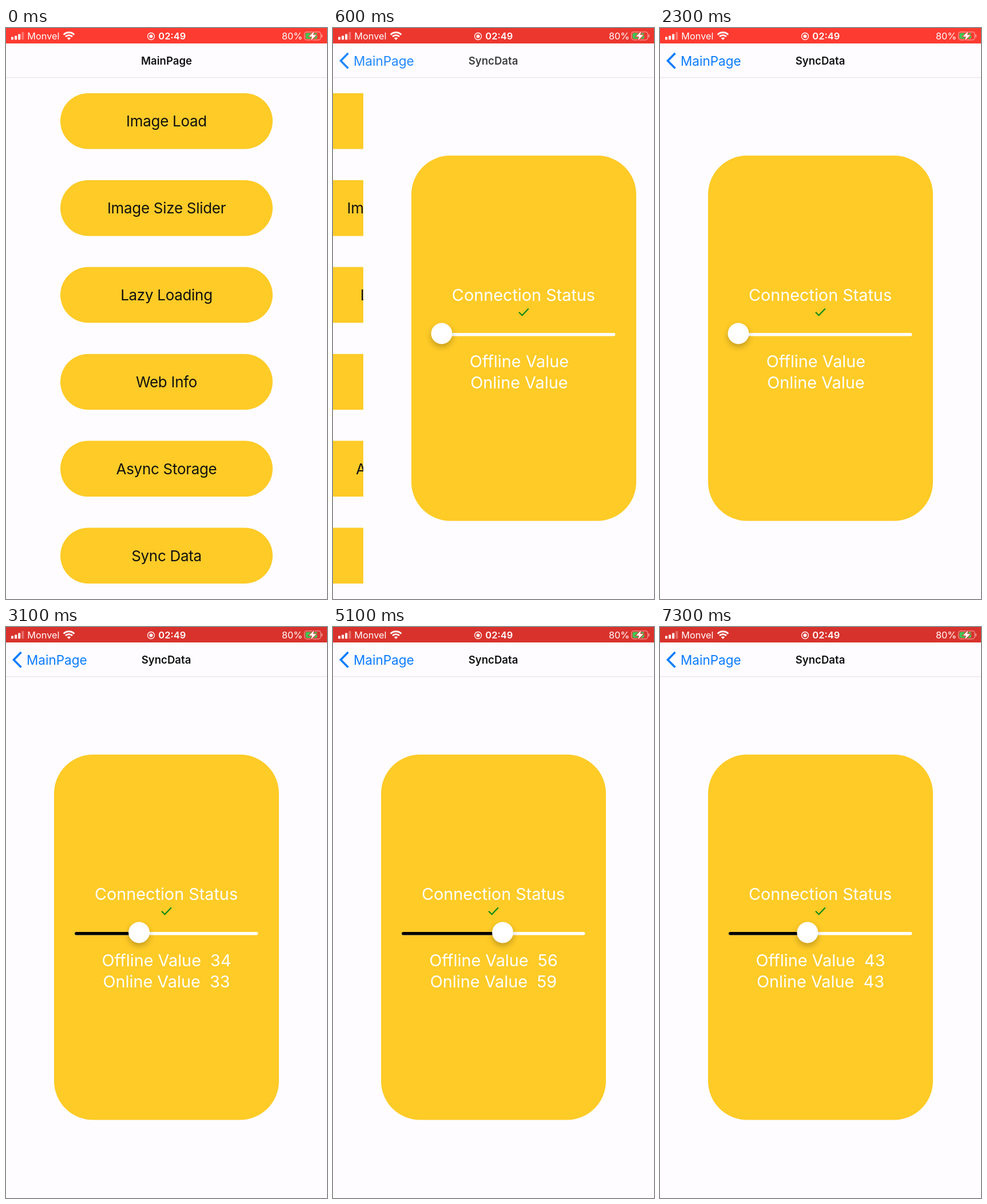
An HTML page with a canvas for the animation above (7.4 s loop, 561 by 998 pixels).

```html
<!DOCTYPE html>
<html lang="en">
<head>
<meta charset="utf-8">
<title>Sync demo</title>
<style>
html, body { margin: 0; width: 100%; height: 100%; overflow: hidden; background: #fefcff; }
canvas { display: block; width: 561px; height: 998px; }
</style>
</head>
<body>
<canvas id="stage" width="561" height="998"></canvas>
<script>
const ctx = document.getElementById('stage').getContext('2d');
const W = 561, H = 998, LOOP = 7400, STEP = 100;
const YELLOW = '#fecb27', PAGE = '#fefcff', INK = '#111', BLUE = '#0a7cff';
const MENU = ['Image Load', 'Image Size Slider', 'Lazy Loading', 'Web Info', 'Async Storage', 'Sync Data'];

// Slider drag: [time in ms, value]
const DRAG = [[2400, 0], [2800, 27], [3100, 33.3], [4000, 100], [4300, 100], [5100, 55.6],
  [5900, 10], [6100, 10], [6900, 47], [7300, 42.1]];
const ONLINE_DELAY = 50;

const clamp = (v, lo = 0, hi = 1) => Math.min(hi, Math.max(lo, v));

function sliderValue(t) {
  const next = DRAG.findIndex(([time]) => time > t);
  if (next === 0) return 0;
  if (next < 0) return DRAG[DRAG.length - 1][1];
  const [t0, v0] = DRAG[next - 1], [t1, v1] = DRAG[next];
  return v0 + (v1 - v0) * (t - t0) / (t1 - t0);
}

// Critically damped spring, 0 to 1
function pushProgress(t) {
  const x = Math.max(0, t - 383) * 0.01826;
  return 1 - (1 + x) * Math.exp(-x);
}

function text(str, x, y, size, color, { align = 'center', weight = 400, spacing = 0 } = {}) {
  ctx.font = `${weight} ${size}px Inter, sans-serif`;
  ctx.letterSpacing = spacing + 'px';
  ctx.textAlign = align;
  ctx.fillStyle = color;
  ctx.fillText(str, x, y);
}

function box(x, y, w, h, r, color) {
  ctx.fillStyle = color;
  ctx.beginPath();
  ctx.roundRect(x, y, w, h, r);
  ctx.fill();
}

function disc(x, y, r, color) {
  ctx.fillStyle = color;
  ctx.beginPath();
  ctx.arc(x, y, r, 0, 2 * Math.PI);
  ctx.fill();
}

function line(points, width, color) {
  ctx.strokeStyle = color;
  ctx.lineWidth = width;
  ctx.beginPath();
  points.forEach(([x, y]) => ctx.lineTo(x, y));
  ctx.stroke();
}

function layer(dx, draw) {
  ctx.save();
  ctx.translate(dx, 0);
  draw();
  ctx.restore();
}

function faded(alpha, draw) {
  ctx.save();
  ctx.globalAlpha = alpha;
  draw();
  ctx.restore();
}

function menuPage() {
  MENU.forEach((label, i) => {
    const y = 114 + i * 151.9;
    box(95, y, 371, 97.5, 48.7, YELLOW);
    text(label, 280.5, y + 58, 26, INK, { spacing: -0.3 });
  });
}

function slider(value) {
  const x = 137 + value * 2.87;
  box(120, 533, 320.5, 5.4, 2.7, '#fff');
  if (value > 0) box(120, 533, x - 120, 5.4, 2.7, '#000');
  ctx.save();
  ctx.shadowColor = 'rgba(0,0,0,.24)';
  ctx.shadowBlur = 11;
  ctx.shadowOffsetY = 5;
  disc(x, 534, 18.5, '#fff');
  ctx.restore();
}

function syncPage(t) {
  const value = sliderValue(t);
  const shown = v => t > DRAG[0][0] ? Math.ceil(v) : '';
  ctx.fillStyle = PAGE;
  ctx.fillRect(0, 0, W, H);
  box(84, 223, 393, 638.5, 68, YELLOW);
  text('Connection Status', 280, 476.5, 28.8, '#fff');
  line([[272, 496.7], [277.6, 502.2], [288.8, 490.6]], 2.2, '#0b8a17');
  slider(value);
  text('Offline Value  ' + shown(value), 280.5, 592.5, 28.8, '#fff');
  text('Online Value  ' + shown(sliderValue(t - ONLINE_DELAY)), 280.5, 630, 28.8, '#fff');
}

function header(progress) {
  const title = { weight: 600 };
  ctx.fillStyle = PAGE;
  ctx.fillRect(0, 27, W, 60);
  ctx.fillStyle = '#e8e6ea';
  ctx.fillRect(0, 86, W, 1.4);
  faded(clamp(1 - 2 * progress), () => text('MainPage', 280.5, 63.5, 18.6, INK, title));
  faded(clamp(2 * progress - 1), () => text('SyncData', 280, 63.5, 18.6, INK, title));
  faded(progress, () => {
    line([[26.5, 44], [13.5, 57.3], [26.5, 70.5]], 3.6, BLUE);
    text('MainPage', 36, 65.8, 22.5, BLUE, { align: 'left' });
  });
}

function wifi() {
  ctx.save();
  ctx.beginPath();
  ctx.moveTo(110, 21);
  ctx.lineTo(95, 6);
  ctx.lineTo(95, 0);
  ctx.lineTo(125, 0);
  ctx.lineTo(125, 6);
  ctx.clip();
  disc(110, 21, 4.6, '#fff');
  ctx.strokeStyle = '#fff';
  ctx.lineWidth = 2.9;
  for (const r of [8.4, 13.2]) {
    ctx.beginPath();
    ctx.arc(110, 21, r, Math.PI, 2 * Math.PI);
    ctx.stroke();
  }
  ctx.restore();
}

function battery(red) {
  ctx.strokeStyle = 'rgba(255,255,255,.5)';
  ctx.lineWidth = 1.3;
  ctx.beginPath();
  ctx.roundRect(521.6, 6.8, 28.5, 14, 4);
  ctx.stroke();
  box(551.3, 11.3, 1.8, 5, 1, 'rgba(255,255,255,.5)');
  box(523.5, 8.7, 20.5, 10.2, 2.4, '#3fc655');
  const bolt = [[538.5, 5.5], [529.5, 15], [535, 15], [532.8, 22], [542.5, 12.3], [536.8, 12.3]];
  ctx.beginPath();
  bolt.forEach(([x, y]) => ctx.lineTo(x, y));
  ctx.closePath();
  ctx.strokeStyle = red;
  ctx.lineWidth = 2.2;
  ctx.stroke();
  ctx.fillStyle = '#fff';
  ctx.fill();
}

function statusBar(t) {
  const glow = 0.5 + 0.5 * Math.cos((t - 100) / 2050 * 2 * Math.PI);
  const mix = (dark, bright) => Math.round(dark + (bright - dark) * glow);
  const red = `rgb(${mix(216, 255)},${mix(50, 59)},${mix(44, 49)})`;
  ctx.fillStyle = red;
  ctx.fillRect(0, 0, W, 27);
  [5, 7, 10, 13.5].forEach((h, i) =>
    box(9 + i * 6.1, 20.5 - h, 4, h, 1, i < 3 ? '#fff' : 'rgba(255,255,255,.3)'));
  text('Monvel', 37.3, 20, 16.3, '#fff', { align: 'left' });
  wifi();
  ctx.strokeStyle = '#fff';
  ctx.lineWidth = 1.3;
  ctx.beginPath();
  ctx.arc(253.5, 14.5, 6, 0, 2 * Math.PI);
  ctx.stroke();
  disc(253.5, 14.5, 3, '#fff');
  text('02:49', 290.3, 20, 16.5, '#fff', { weight: 600 });
  text('80%', 518.3, 20, 16.3, '#fff', { align: 'right' });
  battery(red);
}

function draw(t) {
  const progress = pushProgress(t);
  ctx.fillStyle = PAGE;
  ctx.fillRect(0, 0, W, H);
  layer(-0.3 * W * progress, menuPage);
  layer(W * (1 - progress), () => syncPage(t));
  header(progress);
  statusBar(t);
}

const start = performance.now();
function tick() {
  const t = (performance.now() - start) % LOOP;
  draw(Math.floor(t / STEP) * STEP);
  requestAnimationFrame(tick);
}
tick();
</script>
</body>
</html>
```
